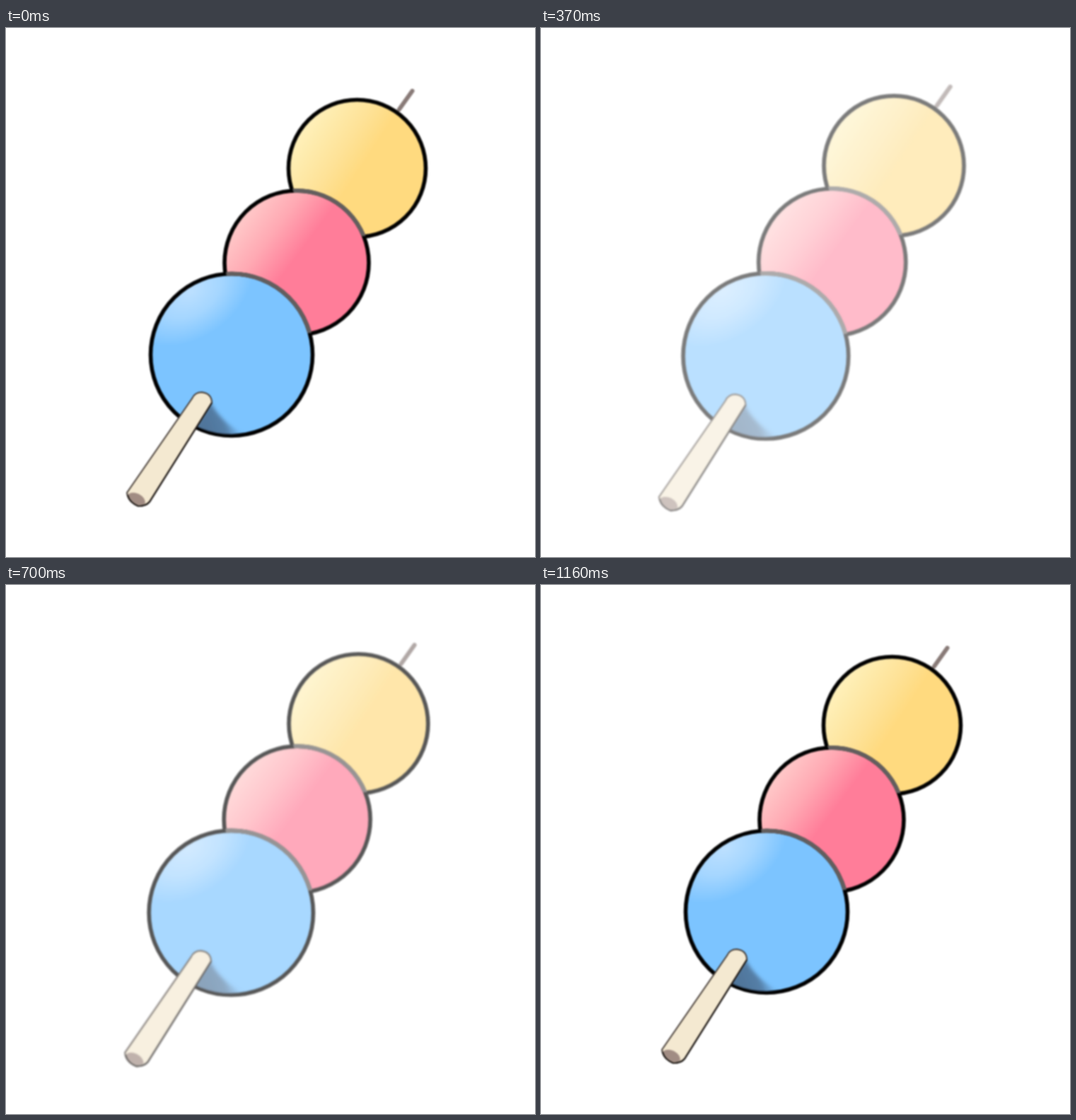
These frames come from a looping animation (748 by 748 pixels, 1.19 s). An HTML page:

```html
<!DOCTYPE html>
<html lang="en">
<head>
<meta charset="utf-8">
<title>Dango pulse</title>
<style>
  html, body { margin: 0; width: 100%; height: 100%; overflow: hidden; background: #fff; }
  svg { display: block; width: 100vw; height: 100vh; }
</style>
</head>
<body>
<svg viewBox="0 0 748 748" xmlns="http://www.w3.org/2000/svg">
  <defs>
    <linearGradient id="yellow" gradientUnits="userSpaceOnUse" x1="415" y1="148" x2="498" y2="203">
      <stop offset="0" stop-color="#fff1bb"/><stop offset=".65" stop-color="#fee297"/><stop offset="1" stop-color="#ffda7f"/>
    </linearGradient>
    <linearGradient id="pink" gradientUnits="userSpaceOnUse" x1="328" y1="278" x2="403" y2="334">
      <stop offset="0" stop-color="#ffc8c8"/><stop offset=".5" stop-color="#ffa9b3"/><stop offset="1" stop-color="#ff7d99"/>
    </linearGradient>
    <radialGradient id="blue" gradientUnits="userSpaceOnUse" cx="0" cy="0" r="1"
      gradientTransform="translate(260 372) rotate(-35) scale(98 66)">
      <stop offset="0" stop-color="#bce0ff"/><stop offset=".5" stop-color="#a5d6ff"/><stop offset="1" stop-color="#7cc4ff"/>
    </radialGradient>
    <linearGradient id="shade" gradientUnits="userSpaceOnUse" x1="284" y1="560" x2="322" y2="546">
      <stop offset="0" stop-color="#48688a" stop-opacity=".85"/><stop offset=".55" stop-color="#48688a" stop-opacity=".75"/>
      <stop offset="1" stop-color="#5c8fbd" stop-opacity=".2"/>
    </linearGradient>
    <filter id="soft"><feGaussianBlur stdDeviation="2.5"/></filter>
    <filter id="smooth" filterUnits="userSpaceOnUse" x="0" y="0" width="748" height="748" color-interpolation-filters="sRGB">
      <feGaussianBlur stdDeviation="1.2"/>
    </filter>
    <clipPath id="inYellow"><circle cx="496.5" cy="198.5" r="96"/></clipPath>
    <clipPath id="inPink"><circle cx="411" cy="332" r="101"/></clipPath>
    <clipPath id="inBlue"><circle cx="319" cy="462" r="113"/></clipPath>
  </defs>
  <g id="dango" filter="url(#smooth)">
    <path d="M556 115L574.5 89" stroke="#887a77" stroke-width="6" stroke-linecap="round"/>
    <g stroke="#000" stroke-width="5.6">
      <circle cx="496.5" cy="198.5" r="97" fill="url(#yellow)"/>
      <circle cx="411" cy="332" r="102" fill="url(#pink)"/>
      <circle cx="319" cy="462" r="114.5" fill="url(#blue)"/>
    </g>
    <g fill="none" stroke="#625e5e" stroke-width="5.8">
      <g clip-path="url(#inYellow)"><circle cx="411" cy="332" r="102"/></g>
      <g clip-path="url(#inPink)"><circle cx="319" cy="462" r="114.5"/></g>
    </g>
    <g clip-path="url(#inBlue)">
      <path d="M289 528Q301 555 338 576L300 582L264 570Z" fill="url(#shade)" filter="url(#soft)"/>
    </g>
    <path d="M263 524Q267 515 277 515Q291 517 291 530L203 670Q198 676 187 676Q172 670 171 657Z"
      fill="#f4e9d1" stroke="#453c36" stroke-width="2" stroke-linejoin="round"/>
    <path d="M291 530L203 670Q198 676 187 676Q175 671 172 660" fill="none" stroke="#1d1815" stroke-width="2.2"/>
    <path d="M173 659Q179 655 188 659Q197 664 197 672Q192 676 185 674Q175 669 173 659Z" fill="#a18c83"/>
  </g>
</svg>
<script>
  const LOOP = 1190, START = 262, PEAK = 530, END = 770;
  const dango = document.getElementById('dango');

  // 0 at rest, 1 at the largest size
  function level(t) {
    const v = t < PEAK ? (t - START) / (PEAK - START) : (END - t) / (END - PEAK);
    return Math.max(0, v);
  }

  function draw(ms) {
    const k = level(ms % LOOP);
    dango.setAttribute('transform', `translate(374 374) scale(${1 + 0.051 * k}) translate(-374 -374)`);
    dango.setAttribute('opacity', Math.max(0.52, 1 - 1.17 * k));
  }

  const begin = performance.now();
  function tick() {
    draw(performance.now() - begin);
    requestAnimationFrame(tick);
  }
  tick();
</script>
</body>
</html>
```
